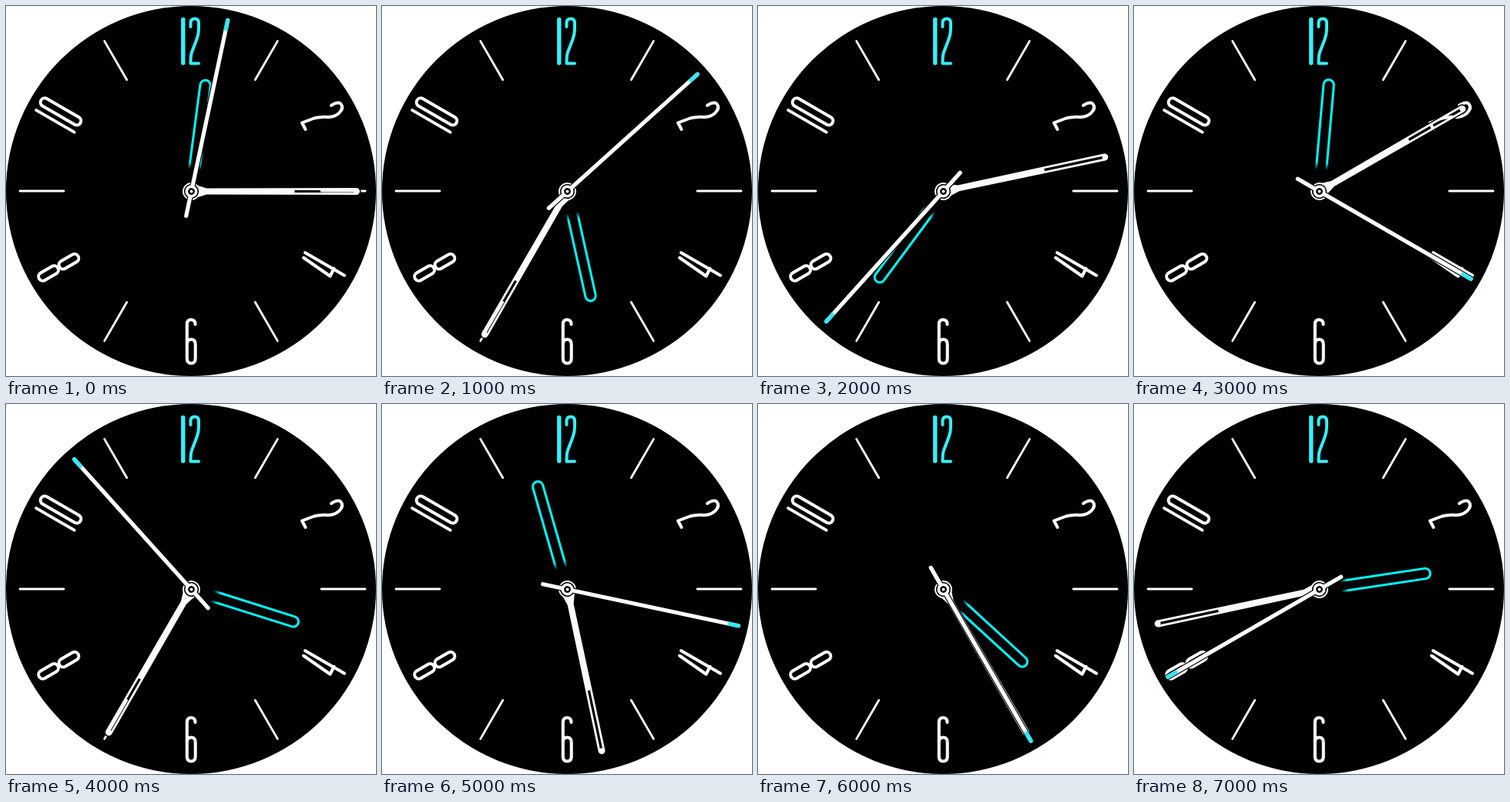
An HTML page that plays this animation: 480 px wide and 480 px high, repeating every 8 s.

```html
<!DOCTYPE html>
<html lang="en">
<head>
<meta charset="utf-8">
<title>Watch face</title>
<style>
  html, body { margin: 0; height: 100%; overflow: hidden; background: #fff; }
  svg { display: block; width: 100vw; height: 100vh; animation: time 8s step-end infinite; }

  /* each second shows another time of day */
  @keyframes time {
    0%    { --h: 12; --m: 15; --s: 2; }
    12.5% { --h: 5;  --m: 35; --s: 8; }
    25%   { --h: 7;  --m: 13; --s: 37; }
    37.5% { --h: 12; --m: 10; --s: 20; }
    50%   { --h: 3;  --m: 35; --s: 53; }
    62.5% { --h: 11; --m: 28; --s: 17; }
    75%   { --h: 4;  --m: 25; --s: 25; }
    87.5%, 100% { --h: 2; --m: 43; --s: 40; }
  }
  .hour   { transform: rotate(calc(var(--h) * 30deg + var(--m) * .5deg)); }
  .minute { transform: rotate(calc(var(--m) * 6deg)); }
  .second { transform: rotate(calc(var(--s) * 6deg)); }

  .line { fill: none; stroke: #fff; stroke-linecap: round; stroke-linejoin: round; }
  .digits { stroke-width: 4; }
  .ticks { stroke-width: 2.8; }
  .twelve { stroke: #33f0fc; }
  .edge { fill: none; stroke: #000; stroke-width: 3; }
  .stem { stroke-width: 5.2; }
  .shadow { stroke: #000; stroke-width: 7.6; }
  .tip { stroke: #33e8f8; stroke-linecap: butt; }
</style>
</head>
<body>
<svg viewBox="0 0 480 480">
  <defs>
    <linearGradient id="fade" gradientUnits="userSpaceOnUse" x1="0" y1="-28" x2="0" y2="-38">
      <stop offset="0" stop-color="#0ff" stop-opacity="0"/>
      <stop offset="1" stop-color="#0ff"/>
    </linearGradient>
    <path id="tick" d="M0 -166.5V-224.5"/>
    <rect id="loop" y="-5.5" width="28" height="11" rx="5.5"/>
  </defs>

  <circle cx="240" cy="240" r="240"/>

  <g class="line digits">
    <g class="twelve">
      <path d="M229.8 17.5V74" stroke-width="5.4"/>
      <path d="M239.5 27V22Q239.5 16.5 244.8 16.5Q250 16.5 250 22V30Q250 36 247.5 43L241 60Q239.5 64 239.5 74.5H250"/>
    </g>
    <path d="M388.5 160L384 151.5L400 145.5Q407 143.5 415 144Q425 145 432 139Q439 132 434 126.5Q430 123.5 422 129"/>
    <path d="M388 320L439 349.5M386 326.5L420.5 350.5L425.5 340.5"/>
    <path d="M245.5 413Q245.5 407 240 407Q234.8 407 234.8 413V457Q234.8 463.5 240.2 463.5Q245.7 463.5 245.7 457V439Q245.7 432.5 240.2 432.5Q234.8 432.5 234.8 439"/>
    <g transform="translate(68.5 339) rotate(-30)">
      <use href="#loop" x="-29.5"/>
      <use href="#loop" x="1"/>
    </g>
    <g transform="translate(71 137) rotate(30)">
      <rect x="-29.5" y="-5.5" width="59" height="11" rx="5.5"/>
      <path d="M-28.5 14.3H28.5"/>
    </g>
  </g>

  <g class="line ticks">
    <path d="M18 240H75M409 240H466"/>
    <g transform="translate(240 240)">
      <use href="#tick" transform="rotate(30)"/>
      <use href="#tick" transform="rotate(150)"/>
      <use href="#tick" transform="rotate(210)"/>
      <use href="#tick" transform="rotate(330)"/>
    </g>
  </g>

  <g transform="translate(240.5 240.5)">
    <path class="hour" d="M-6.7 -28V-138.7A6.7 6.7 0 0 1 6.7 -138.7V-28"
      fill="none" stroke="url(#fade)" stroke-width="3"/>

    <g class="minute">
      <path class="edge" d="M-8 -7L-4 -20L-4.5 -214A4.5 4.5 0 0 1 4.5 -214L4 -20L8 -7"/>
      <path fill="#fafafa" fill-rule="evenodd"
        d="M-8 -7L-4 -20L-4.5 -214A4.5 4.5 0 0 1 4.5 -214L4 -20L8 -7Z
           M-1.6 -134H1.6V-212A1.6 1.6 0 0 1 -1.6 -212Z"/>
      <circle r="10.5" stroke="#fff" stroke-width="1.8"/>
    </g>

    <g class="second">
      <path class="line shadow" d="M0 32.5V-227"/>
      <path class="line stem" d="M0 32.5V-227"/>
      <path class="line stem tip" d="M0 -227V-213"/>
      <circle cy="-227" r="2.6" fill="#33e8f8"/>
      <circle r="6.2" stroke="#fff" stroke-width="3.6"/>
      <circle r="2" fill="#fff"/>
    </g>
  </g>
</svg>
</body>
</html>
```
